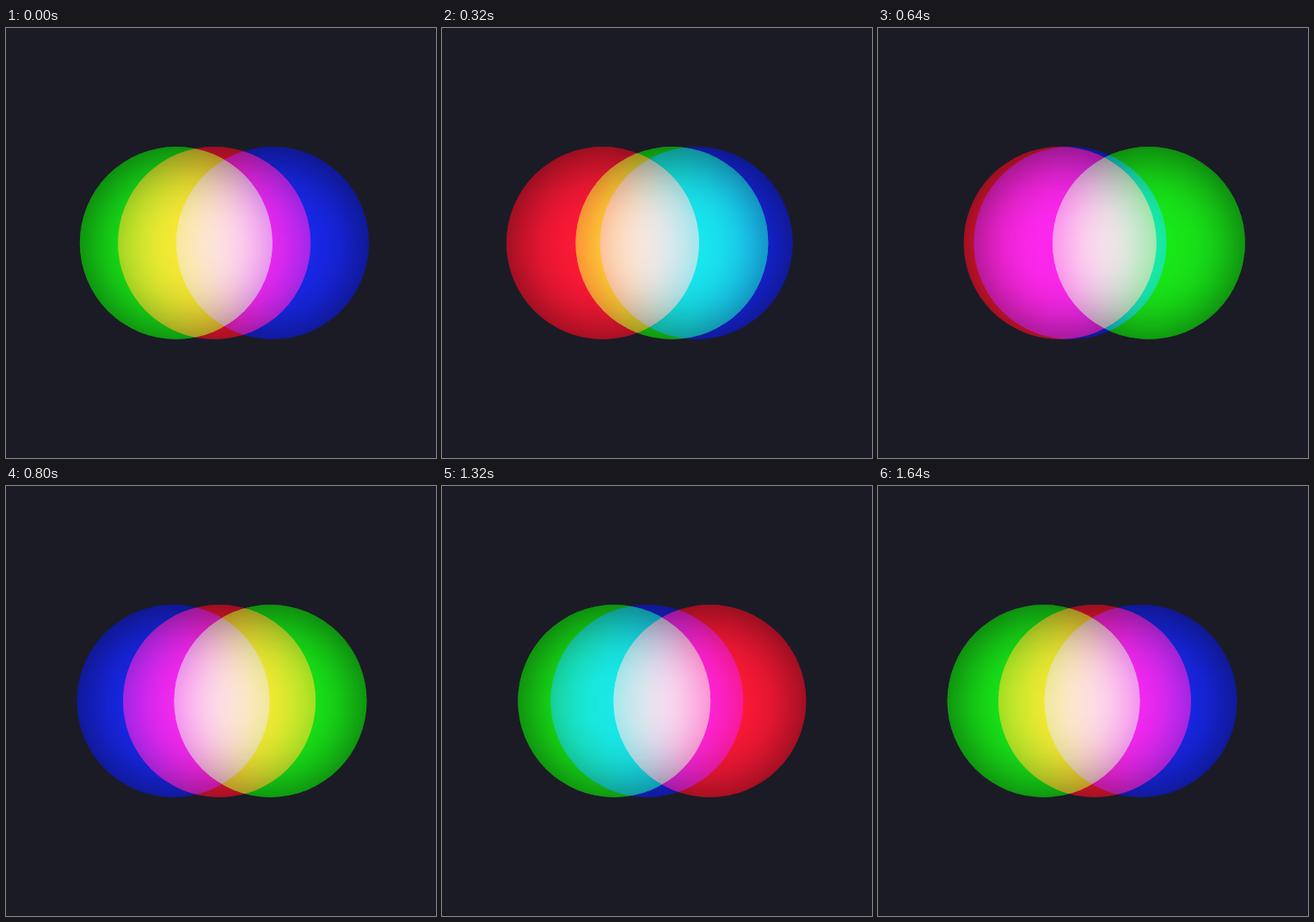
Recreate the animation shown at these times as an HTML page. Size 500 by 500 pixels, loop 1.68 s.

```html
<!DOCTYPE html>
<html lang="en">
<head>
<meta charset="utf-8">
<title>Colour orbit</title>
<style>
  html, body {
    margin: 0;
    width: 100%;
    height: 100%;
    overflow: hidden;
    background: #1b1b26;
  }
  /* The discs blend with each other, not with the background. */
  .stage {
    position: relative;
    width: 500px;
    height: 500px;
    isolation: isolate;
  }
  .disc {
    position: absolute;
    left: 137.5px;
    top: 137.5px;
    width: 224.5px;
    height: 224.5px;
    border-radius: 50%;
    mix-blend-mode: lighten;
    box-shadow: inset 0 3px 70px rgba(0, 0, 0, .65);
  }
  .red { background: rgb(252, 25, 54); }
  .green { background: rgb(25, 232, 25); }
  .blue { background: rgb(25, 40, 238); }
</style>
</head>
<body>
<div class="stage">
  <div class="disc red"></div>
  <div class="disc green"></div>
  <div class="disc blue"></div>
</div>
<script>
  const LOOP = 1680, STEP = 40, SWING = 65.2, PHASE = 0.12;
  const discs = document.querySelectorAll('.disc');

  // Three sine swings, a third of a turn apart, held for one step each.
  function draw() {
    const time = Math.floor(performance.now() % LOOP / STEP) * STEP;
    discs.forEach((disc, i) => {
      const angle = 2 * Math.PI * (time / LOOP + i / 3) + PHASE;
      disc.style.transform = `translateX(${-SWING * Math.sin(angle)}px)`;
    });
    requestAnimationFrame(draw);
  }
  draw();
</script>
</body>
</html>
```
